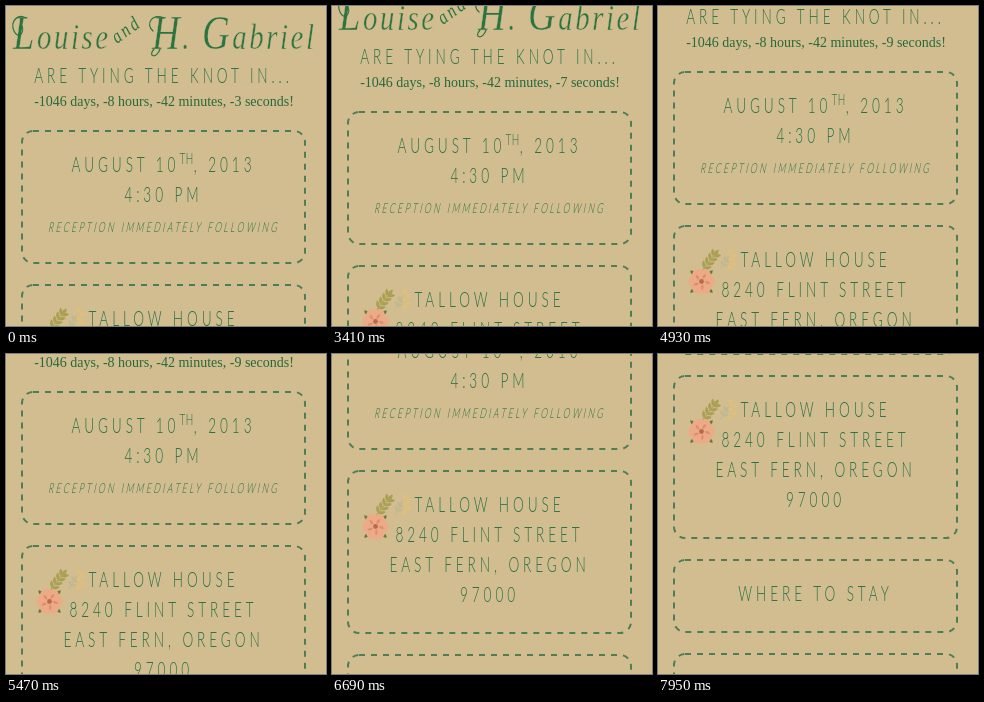
Write an HTML page that moves like this. It is 320 px wide and 320 px high and loops after 8000 ms.

```html
<!DOCTYPE html>
<html lang="en">
<head>
<meta charset="utf-8">
<title>Wedding invitation</title>
<style>
  html, body { margin: 0; width: 100%; height: 100%; overflow: hidden; background: #d1bd8f; }
  svg { display: block; width: 100vw; height: 100vh; }
  text { white-space: pre; }
  .card { fill: none; stroke: #4f7d58; stroke-width: 2; stroke-dasharray: 6 6; }
  .hand { font: 300 22px Lato, sans-serif; letter-spacing: .285em; fill: #2a7048; text-anchor: middle; }
  .note { font-size: 13.8px; }
  .sup { font-size: 16px; letter-spacing: .06em; }
  .script { font: italic 36px "Liberation Serif", serif; letter-spacing: .09em; fill: #2b7340;
    stroke: #d1bd8f; stroke-width: .5; }
  .cap { font-size: 48px; }
  .and { font-size: 20px; stroke: none; }
  .swash { fill: none; stroke: #2b7340; stroke-width: 1.2; stroke-linecap: round; }
  .count { font: 14px "Liberation Serif", serif; fill: #28683c; text-anchor: middle; }
</style>
</head>
<body>
<svg viewBox="0 0 320 320">
  <rect width="320" height="320" fill="#d1bd8f"/>
  <g id="page">
    <g class="script">
      <text transform="translate(7 43) scale(.8 1)"><tspan class="cap">L</tspan>ouise</text>
      <text class="and" transform="translate(111 38) rotate(-36) scale(.8 1)">and</text>
      <text transform="translate(146 43) scale(.8 1)"><tspan class="cap">H</tspan>. <tspan class="cap">G</tspan>abriel</text>
    </g>
    <g class="swash">
      <path d="M20 12C11 7 4 16 8 25S19 27 16 20"/>
      <path d="M158 12C146 7 139 18 147 25"/>
      <path d="M148 43C141 51 151 53 154 43"/>
    </g>
    <text id="count" class="count" x="158" y="100"></text>
    <g id="content"></g>
    <g id="flower" transform="translate(43.5 334.5)"></g>
  </g>
</svg>
<script>
const byId = id => document.getElementById(id);
const DURATION = 8000;
const CENTER = 157.5;

// Hand lettering: tall, narrow and widely spaced
const line = (y, words, style = '', slant = 0) =>
  `<text class="hand ${style}" transform="translate(${CENTER} ${y}) skewX(${-slant}) scale(.62 1)">${words}</text>`;

const cards = [
  { height: 134, lines: ['AUGUST 10<tspan class="sup" dy="-8">TH</tspan><tspan dy="8">, 2013</tspan>', '4:30 PM'],
    note: 'RECEPTION IMMEDIATELY FOLLOWING' },
  { height: 164, lines: ['TALLOW HOUSE', '8240 FLINT STREET', 'EAST FERN, OREGON', '97000'] },
  { height: 74, lines: ['WHERE TO STAY'] },
  { height: 134, lines: [] },
];

function layout() {
  let top = 124;
  let parts = line(77, 'ARE TYING THE KNOT IN...');
  for (const { height, lines, note } of cards) {
    const baseline = row => top + 42 + row * 30;
    parts += `<rect class="card" x="16" y="${top + 1}" width="283" height="${height - 2}" rx="11"/>`;
    parts += lines.map((words, row) => line(baseline(row), words)).join('');
    if (note) parts += line(baseline(lines.length) - .5, note, 'note', 12);
    top += height + 20;
  }
  return parts;
}

const leaf = (x, angle, length, fill) =>
  `<path transform="translate(${x}) rotate(${angle})" fill="${fill}"
    d="M0 0Q${length / 2} ${-length * .42} ${length} 0Q${length / 2} ${length * .42} 0 0"/>`;

function sprig(x, y, angle, pairs, size, fill) {
  const end = pairs * 5;
  let parts = `<path d="M0 0H${end}" stroke="${fill}"/>` + leaf(end, 0, size, fill);
  for (let at = 4; at < end; at += 5) {
    parts += leaf(at, -42, size, fill) + leaf(at, 42, size, fill);
  }
  return `<g transform="translate(${x} ${y}) rotate(${angle})">${parts}</g>`;
}

function around(count, draw) {
  return Array.from({ length: count }, (_, i) =>
    `<g transform="rotate(${i * 360 / count})">${draw(i)}</g>`).join('');
}

function flower() {
  const dot = (x, y, r, fill) => `<circle cx="${x}" cy="${y}" r="${r}" fill="${fill}"/>`;
  let parts = sprig(0, -10, -52, 4, 8, '#aaa053') + sprig(19, -12, -58, 2, 6, '#c0b88f');
  for (let i = 0; i < 5; i++) parts += dot(29 + i % 2 * 4, i * 4 - 30, 2.2, '#dfbf79');
  parts += around(4, () => `<g transform="rotate(45)">${leaf(8, 0, 8, '#66763f')}</g>`);
  parts += around(6, () => dot(6.5, 0, 6.5, '#ecaa86'));
  parts += around(5, () => leaf(3, 20, 6, '#d98f70'));
  return parts + dot(0, 0, 2.4, '#b96b4d');
}

byId('content').innerHTML = layout();
byId('flower').innerHTML = flower();

// The wheel turns in bursts; each key is [scroll step, offset in px]
const SCROLL_START = 2970;
const STEP = 137.7;
const keys = [[-1, 0], [3, 19], [5, 19], [6, 24], [8, 24], [14, 59],
  [22, 114], [27, 162], [31, 234], [33, 234], [36, 257]];

function scrollAt(t) {
  const step = Math.max(-1, Math.floor((t - SCROLL_START) / STEP));
  const next = keys.findIndex(([at]) => at > step);
  if (next < 0) return keys[keys.length - 1][1];
  const [[s0, y0], [s1, y1]] = keys.slice(next - 1, next + 1);
  return Math.round(y0 + (y1 - y0) * (step - s0) / (s1 - s0));
}

function render(t) {
  const seconds = 4 + Math.floor((t - 130) / 960);
  byId('page').setAttribute('transform', `translate(0 ${-scrollAt(t)})`);
  byId('count').textContent = `-1046 days, -8 hours, -42 minutes, -${seconds} seconds!`;
}

const start = performance.now();
function frame() {
  render((performance.now() - start) % DURATION);
  requestAnimationFrame(frame);
}
frame();
</script>
</body>
</html>
```
